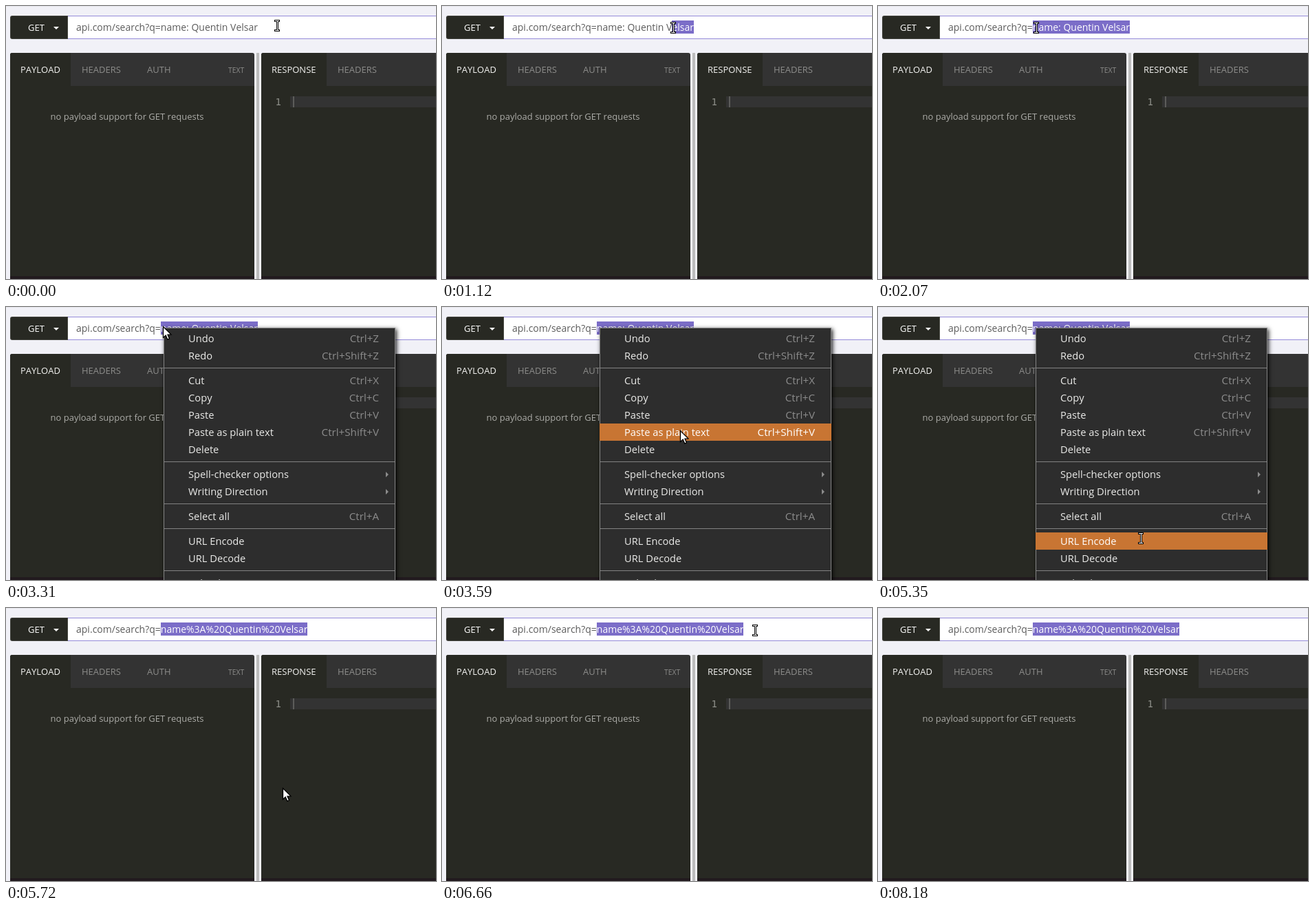
These frames come from a looping animation (625x396 px, 9.72 s). An HTML page with a canvas:

```html
<!DOCTYPE html>
<html lang="en">
<head>
<meta charset="utf-8">
<title>Encode a query from the context menu</title>
<style>
  html, body { margin: 0; width: 100%; height: 100%; overflow: hidden; background: #f1f1f7; }
  canvas { display: block; width: 625px; height: 396px; }
</style>
</head>
<body>
<canvas id="stage" width="625" height="396"></canvas>
<script>
const ctx = document.getElementById('stage').getContext('2d');
const LOOP = 9720, STEP = 40;
const SANS = '"Open Sans", "Noto Sans", sans-serif';
const MONO = '"DejaVu Sans Mono", monospace';
const DARK = '#282923', BAR = '#333333', VIOLET = '#7b6dc8', ORANGE = '#c87533';
const BRIGHT = '#f4f4f2', MUTED = '#8d8d8b';

const PREFIX = 'api.com/search?q=';
const PLAIN = 'name: Quentin Velsar';
const ENCODED = encodeURIComponent(PLAIN);
const URL_X = 102;

const DRAG_START = 860, DRAG_END = 2100;
const MENU_OPEN = 2950, MENU_HOVER = 3310, MENU_PICK = 5350, MENU_CLOSED = 5390;
const ARROW_BACK = 5430, POINTER_GONE = 8180;

// The pointer eases out from one stop to the next; a larger power brakes harder.
const HOME = { x: 394, y: 28 };
const MOVES = [
  { from: 0, to: 400, x: 379, y: 31 },
  { from: DRAG_START, to: 1820, x: 233, y: 31 },
  { from: 1890, to: 2050, x: 230, y: 31 },
  { from: MENU_HOVER, to: 4110, x: 382, y: 335, powX: 3.5, powY: 1.6 },
  { from: 5600, to: 6560, x: 459, y: 33, powX: 2.5, powY: 2 },
  { from: 6580, to: 6780, x: 451, y: 30 }
];

const MENU = { x: 229, y: 30, w: 337, first: 46, row: 25, gap: 11 };
const GROUPS = [
  ['Undo|Ctrl+Z', 'Redo|Ctrl+Shift+Z'],
  ['Cut|Ctrl+X', 'Copy|Ctrl+C', 'Paste|Ctrl+V', 'Paste as plain text|Ctrl+Shift+V', 'Delete'],
  ['Spell-checker options|>', 'Writing Direction|>'],
  ['Select all|Ctrl+A'],
  ['URL Encode', 'URL Decode'],
  ['Reload']
];

function rect(x, y, w, h, color) {
  ctx.fillStyle = color;
  ctx.fillRect(x, y, w, h);
}

function round(x, y, w, h, radii, color) {
  ctx.fillStyle = color;
  ctx.beginPath();
  ctx.roundRect(x, y, w, h, radii);
  ctx.fill();
}

function polygon(points, color) {
  ctx.fillStyle = color;
  ctx.beginPath();
  points.forEach(([x, y]) => ctx.lineTo(x, y));
  ctx.closePath();
  ctx.fill();
}

function text(str, x, y, size, color, align = 'left', family = SANS) {
  ctx.font = `${size}px ${family}`;
  ctx.fontKerning = 'none';
  ctx.fillStyle = color;
  ctx.textAlign = align;
  ctx.fillText(str, x, y);
}

function pointerAt(t) {
  let at = HOME;
  for (const { from, to, x, y, powX = 1.2, powY = 1.2 } of MOVES) {
    if (t < from) break;
    const held = Math.floor((t - from) / STEP) * STEP;
    const left = Math.max(0, 1 - held / (to - from));
    at = {
      x: Math.round(x + (at.x - x) * left ** powX),
      y: Math.round(y + (at.y - y) * left ** powY)
    };
  }
  return at;
}

const edgeAt = (str, i) => URL_X + ctx.measureText(str.slice(0, i)).width;

// Character edge nearest to x, never left of the query value.
function nearestEdge(str, x) {
  let i = str.length;
  while (i > PREFIX.length && (edgeAt(str, i) + edgeAt(str, i - 1)) / 2 > x) i--;
  return Math.round(edgeAt(str, i));
}

function drawUrl(t) {
  const str = PREFIX + (t < MENU_CLOSED ? PLAIN : ENCODED);
  text(str, URL_X, 36, 14, '#5c5c5c');
  const end = Math.round(edgeAt(str, str.length));
  if (t >= 170 && t < 670) rect(end, 21, 1, 19, '#555555');
  if (t < DRAG_START) return;

  const start = nearestEdge(str, pointerAt(Math.min(t, DRAG_END)).x - 2);
  ctx.save();
  ctx.beginPath();
  ctx.rect(start, 21, end - start, 19);
  ctx.clip();
  rect(start, 21, end - start, 19, VIOLET);
  text(str, URL_X, 36, 14, '#ffffff');
  ctx.restore();
}

function drawPanel(x, w, activeW) {
  round(x, 68, w, 328, [3, 3, 0, 0], BAR);
  round(x, 68, activeW, 48, [3, 0, 0, 0], DARK);
  rect(x, 116, w, 280, DARK);
  rect(x, 392, w, 4, '#211a1e');
}

function drawApp(t) {
  rect(0, 0, 625, 396, '#f1f1f7');
  rect(0, 0, 625, 1, '#e6e6ec');

  rect(90, 14, 535, 34, '#968bda');
  rect(90, 15, 535, 32, '#ffffff');
  round(6, 14, 84, 34, [3, 0, 0, 3], '#42433d');
  round(7, 15, 82, 32, [2, 0, 0, 2], DARK);
  text('GET', 32, 36, 13, '#ffffff');
  polygon([[69, 30], [77, 30], [73, 34]], '#ffffff');
  drawUrl(t);

  drawPanel(6, 355, 88);
  drawPanel(371, 260, 95);
  rect(364, 68, 4, 328, '#bdbdbd');

  text('PAYLOAD', 21, 97, 13, BRIGHT);
  text('HEADERS', 110, 97, 13, MUTED);
  text('AUTH', 205, 97, 13, MUTED);
  text('TEXT', 323, 97, 10.4, MUTED);
  text('RESPONSE', 386, 97, 13, BRIGHT);
  text('HEADERS', 482, 97, 13, MUTED);
  text('no payload support for GET requests', 64.5, 165, 13, '#acaca8');

  rect(413, 131, 212, 16, BAR);
  rect(417, 131, 2, 16, '#5c5c5a');
  text('1', 400, 144, 14, '#8f908a', 'right', MONO);
}

function drawItem(item, mid, active) {
  const [label, hint] = item.split('|');
  const hintColor = active ? '#ffffff' : '#8c8c8c';
  if (active) rect(MENU.x, mid - 13, MENU.w, MENU.row, ORANGE);
  text(label, 265, mid + 5, 14.7, active ? '#ffffff' : '#ebebe9');
  if (hint === '>') polygon([[552, mid - 4], [556, mid], [552, mid + 4]], hintColor);
  else if (hint) text(hint, 542, mid + 5, 15.2, hintColor, 'right');
}

function drawMenu(pointerY) {
  const { x, y, w, first, row, gap } = MENU;
  ctx.save();
  ctx.shadowColor = 'rgba(0,0,0,.85)';
  ctx.shadowBlur = 6;
  ctx.shadowOffsetX = ctx.shadowOffsetY = 2;
  rect(x, y, w, 380, '#868686');
  ctx.restore();
  rect(x + 1, y + 1, w - 2, 380, '#2d2d2d');

  let mid = first;
  for (const group of GROUPS) {
    for (const item of group) {
      drawItem(item, mid, pointerY >= mid - 13 && pointerY < mid + 12);
      mid += row;
    }
    rect(x + 1, mid - 8, w - 2, 1, '#828282');
    mid += gap;
  }
}

function drawBeam({ x, y }) {
  const layer = (grow, color) => {
    for (const side of [-7, 7]) {
      rect(x - 3 - grow, y + side - grow, 6 + 2 * grow, 1 + 2 * grow, color);
    }
    rect(x - grow, y - 7, 1 + 2 * grow, 14, color);
  };
  layer(1, '#000000');
  layer(0, '#ffffff');
}

function drawArrow({ x, y }) {
  ctx.save();
  ctx.translate(x - 1.5, y - 2.5);
  polygon([[0, 0], [0, 16], [3.7, 12.6], [6.3, 18.6], [9, 17.4], [6.5, 11.6], [11.4, 11.4]], '#ffffff');
  ctx.lineWidth = 1.3;
  ctx.strokeStyle = '#000000';
  ctx.stroke();
  ctx.restore();
}

function drawPointer(t, at) {
  if (t >= POINTER_GONE) return;
  const overMenu = t >= MENU_HOVER && t < MENU_PICK;
  const overPage = t >= ARROW_BACK && at.y > 48;
  (overMenu || overPage ? drawArrow : drawBeam)(at);
}

function draw(t) {
  const at = pointerAt(t);
  drawApp(t);
  if (t >= MENU_OPEN && t < MENU_CLOSED) drawMenu(at.y);
  drawPointer(t, at);
}

const began = performance.now();
function tick() {
  draw((performance.now() - began) % LOOP);
  requestAnimationFrame(tick);
}
tick();
</script>
</body>
</html>
```
